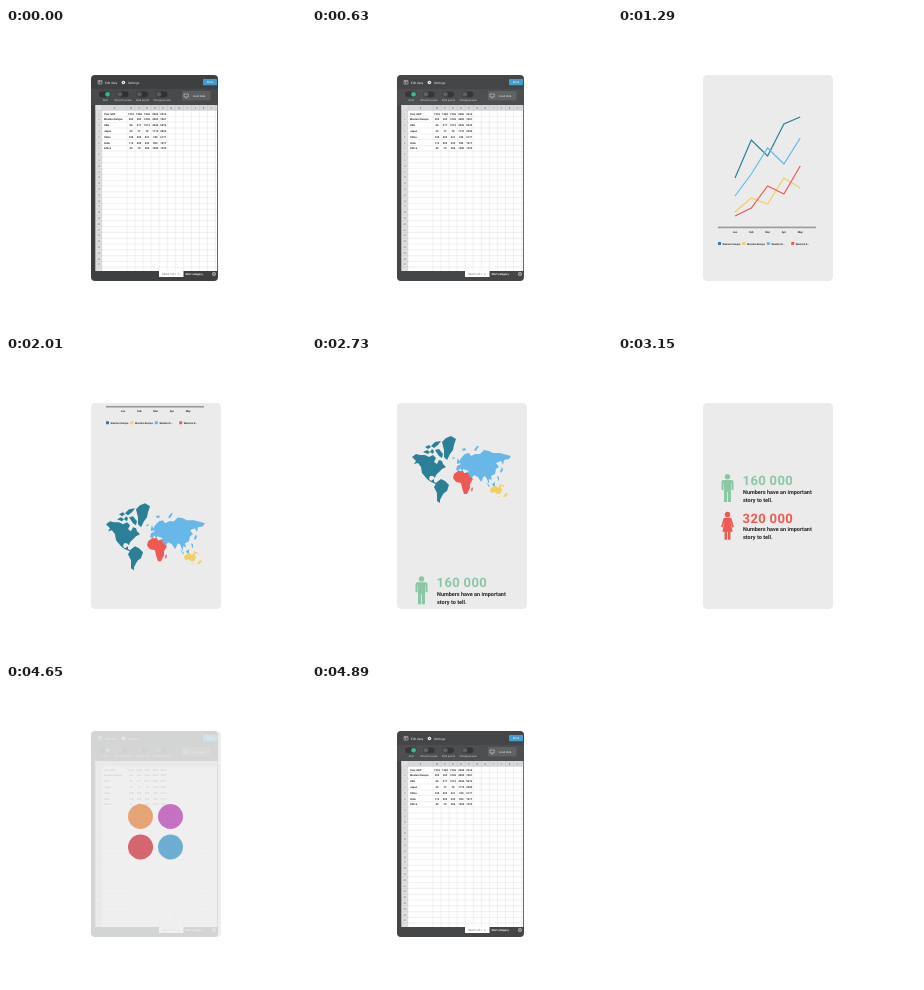
An HTML page for the animation above (4.92 s loop, 300x300 px).

```html
<!DOCTYPE html>
<html lang="en">
<head>
<meta charset="utf-8">
<style>
html, body { margin: 0; width: 100%; height: 100%; overflow: hidden; background: #fff; }
svg { display: block; width: 100vw; height: 100vh; font-family: Roboto, sans-serif; text-rendering: geometricPrecision; }
</style>
</head>
<body>
<svg id="stage" viewBox="0 0 300 300"></svg>
<script>
const LOOP = 4920, STEP = 30;
const TEAL = '#2b7f96', YELLOW = '#f2cf5e', BLUE = '#67b8e8', RED = '#ee5a52', GREEN = '#8bc6a5';

const rect = (x, y, w, h, fill, r = 0) =>
  `<rect x="${x}" y="${y}" width="${w}" height="${h}" rx="${r}" fill="${fill}"/>`;
const circle = (x, y, r, fill) => `<circle cx="${x}" cy="${y}" r="${r}" fill="${fill}"/>`;
const text = (x, y, size, fill, str, extra = '') =>
  `<text x="${x}" y="${y}" font-size="${size}" fill="${fill}" ${extra}>${str}</text>`;
const path = (d, fill, extra = '') => `<path d="${d}" fill="${fill}" ${extra}/>`;
const group = (id, body, extra = '') => `<g id="${id}" ${extra}>${body}</g>`;
const MID = 'text-anchor="middle"', BOLD = 'font-weight="700"';

function sheet() {
  const top = 82.6, rowH = 5.8, colX = i => i ? 121 + (i - 1) * 8.05 : 96;
  let s = rect(85, 47, 127, 206, '#3e3f41', 4) + rect(85, 61, 127, 16, '#48494b');

  // Header
  s += path('M92 52.5h4v3.6h-4zM92 53.7h4M93.4 52.5v3.6', 'none', 'stroke="#ccc" stroke-width=".5"');
  s += text(99, 55.5, 3.1, '#eee', 'Edit data') + circle(117.4, 54.5, 1.8, '#eee') + circle(117.4, 54.5, .6, '#3e3f41');
  s += text(122, 55.5, 3.1, '#eee', 'Settings');
  s += rect(197, 51, 14, 6.2, '#3d9bd0', .7) + text(204, 55.2, 2.9, '#fff', 'Done', MID);

  // Toolbar
  ['Grid', 'Smooth curves', 'Data points', 'Transpose axis'].forEach((label, i) => {
    const x = [93, 111, 130.5, 150][i];
    s += rect(x, 63.4, 11.5, 5.8, '#303133', 2.9);
    s += circle(x + (i ? 2.9 : 8.6), 66.3, 2.4, i ? '#5a5b5d' : '#35b48a');
    s += text(x + 6, 72.8, 2.6, '#ddd', label, MID);
  });
  s += rect(176, 63, 28.5, 9.6, '#5c5d60', .8);
  s += path('M178 66h4.4v3h-4.4zM179.3 70h1.8', 'none', 'stroke="#ddd" stroke-width=".5"');
  s += text(193, 69, 2.8, '#eee', 'Load data', MID);

  // Grid
  s += rect(89.6, 77, 121.6, 166, '#fff') + rect(89.6, 77, 121.6, 5.6, '#d6d7d8') + rect(89.6, 77, 6.4, 166, '#dedfe0');
  let lines = '';
  for (let i = 0; i < 28; i++) {
    const y = top + i * rowH;
    lines += `M89.6 ${y}H211.2`;
    if (i < 27) s += text(92.8, y + 4, 2.4, '#666', i + 1, MID);
  }
  for (let i = 0; i < 13; i++) {
    lines += `M${colX(i)} 77V243`;
    if (i < 12) s += text((colX(i) + colX(i + 1)) / 2, 81, 2.5, '#444', 'ABCDEFGHIJKL'[i], MID);
  }
  s += path(lines, 'none', 'stroke="#999" stroke-width=".25" opacity=".55"');
  [
    'Year, GDP|1976|1986|1996|2006|2016',
    'Western Europe|302|362|1006|4000|7067',
    'USA|86|217|1013|4246|5674',
    'Japan|30|77|78|1710|2096',
    'China|100|200|221|740|6171',
    'India|113|209|222|500|1377',
    'Africa|43|70|306|1300|1372'
  ].forEach((row, r) => row.split('|').forEach((cell, c) => {
    s += text(c ? colX(c) + 4 : 98, top + r * rowH + 4, 2.6, '#222', cell, BOLD + (c ? ' ' + MID : ''));
  }));

  // Tabs
  s += rect(153, 242.8, 24.5, 6.2, '#fff') + text(156, 247, 2.7, '#444', 'Chart 1 of 1') + text(172, 247, 3, '#444', '×');
  s += text(179.5, 247, 2.7, '#fff', 'Start category', BOLD);
  s += circle(208, 246, 2, '#aaa') + path('M207 246h2M208 245v2', 'none', 'stroke="#3e3f41" stroke-width=".5"');
  return s;
}

function chart() {
  const months = ['Jan', 'Feb', 'Mar', 'Apr', 'May'], x = i => 117 + i * 16.3;
  const series = [[TEAL, 150, 112, 128, 96, 89], [YELLOW, 184, 170, 176, 150, 160],
                  [BLUE, 168, 146, 120, 136, 110], [RED, 188, 180, 158, 166, 138]];
  let s = rect(100, 198.6, 98, 1.6, '#999');
  months.forEach((m, i) => s += text(x(i), 204.6, 2.6, '#222', m, MID + BOLD.padStart(20)));
  series.forEach(([color, ...ys], i) => {
    s += path('M' + ys.map((y, j) => x(j) + ' ' + y).join('L'), 'none', `stroke="${color}" stroke-width="1.2"`);
    s += rect(100 + i * 24.4, 214, 3, 3, color, .6);
    s += text(104.6 + i * 24.4, 216.6, 2.5, '#222', i < 2 ? 'Western Europe' : 'Western E...', BOLD);
  });
  return s;
}

function map() {
  const americas = 'M100 101L104 98 108 99 113 99 117 101 121 99 124 102 122 106 125 108 127 104 130 105 131 108 134 111 130 113 127 116 124 119 123 122 121 120 118 120 117 123 119 125 122 123 122 126 125 127 124 128 119 126 115 123 110 117 109 111 106 107 102 108 104 105z'
    + 'M111 96l4-2 3 2-2 2zM113 91l4-2 2 2-3 2zM118 96l2-3 2 2-1 3zM119 90l4-4 6-1-3 4-4 3zM123 94l4-1 4 5-1 4-3-2z'
    + 'M130 86L134 82 139 80 144 83 142 89 141 94 138 98 135 104 132 101 132 94z'
    + 'M125 126L129 123 133 125 137 129 135 135 132 137 130 140 128 144 128 147 125 145 125 137 122 131z';
  const eurasia = 'M144 114L145 110 149 108 147 106 149 102 153 98 157 97 159 100 163 98 168 98 172 94 177 95 181 97 188 97 199 100 197 103 192 104 191 109 189 105 184 107 187 111 184 113 183 118 179 120 180 124 177 123 177 128 174 121 172 120 169 126 166 121 162 119 160 122 156 124 153 117 157 115 151 113 151 116 148 112 147 115z'
    + 'M145 105l1-3 2 5-3 1zM140 102l2-1 1 1-2 1zM150 93l3-1 1 2-3 1zM162 94l3-4 2 0-3 5z'
    + 'M188 115l2-4 1 3-2 3zM174 126l4 4-1 1zM180 128l3-2 0 4-2 0zM185 120l1 4 1 1 0-4z';
  const africa = 'M142 118L146 115 151 115 152 117 156 117 158 121 161 123 158 128 158 132 155 138 152 138 150 132 149 127 144 126 141 122zM159 134l1-3 1 1-1 4z';
  const oceania = 'M178 133L182 130 184 130 186 132 188 129 190 134 188 138 185 138 183 136 179 137zM186 140h2l-1 1zM191 141l3-4 2 1-3 3zM187 128l4 1 2 2-4-1z';
  return path(americas, TEAL) + path(eurasia, BLUE) + path(africa, RED) + path(oceania, YELLOW);
}

function fact(y, color, figure, body) {
  return circle(109.5, y + 2.6, 2.7, color) + `<g transform="translate(109.5 ${y})">${path(body, color)}</g>`
    + text(124.6, y + 10.8, 13, color, figure, BOLD + ' letter-spacing=".35"')
    + text(125, y + 19.5, 5.5, '#222', 'Numbers have an important', BOLD)
    + text(125, y + 27.5, 5.5, '#222', 'story to tell.', BOLD);
}

function numbers() {
  const man = 'M-4 6H4Q6 6 6 8V16H4V9.5H3.5V28H.4V18H-.4V28H-3.5V9.5H-4V16H-6V8Q-6 6-4 6z';
  const woman = 'M-2.6 6H2.6Q3.8 6 4.2 7.4L6.4 15 4.8 15.6 2.6 9 5.2 20H3V28H.5V20H-.5V28H-3V20H-5.2L-2.6 9-4.8 15.6-6.4 15-4.2 7.4Q-3.8 6-2.6 6z';
  return fact(118, GREEN, '160 000', man) + fact(155.7, RED, '320 000', woman);
}

const dots = () => ['#de8544', '#b23fae', '#c62f3c', '#3b92c4']
  .map((c, i) => circle(134.5 + i % 2 * 30, i < 2 ? 132.5 : 163, 12.5, c)).join('');

const pages = [chart(), `<g transform="translate(0 36.8)">${map()}</g>`, numbers(), dots()];
const scrolls = [[1830, 179], [2730, 139], [3630, 168]];

const stage = document.getElementById('stage');
stage.innerHTML = `<clipPath id="cardClip">${rect(85, 47, 130, 206, '#000', 4)}</clipPath>`
  + group('card', rect(85, 47, 130, 206, '#ebebeb', 4) + pages.map((p, i) => group('page' + i, p)).join(''), 'clip-path="url(#cardClip)"')
  + group('sheet', sheet());

const el = id => document.getElementById(id);
const clamp = v => Math.min(1, Math.max(0, v));
const place = (id, x, y, opacity = 1) => {
  el(id).setAttribute('transform', `translate(${x} ${y})`);
  el(id).setAttribute('opacity', opacity);
};

// Each scroll starts with a small jump, then eases out.
const scrollEase = (t, start) => t < start ? 0 : 1 - (1 - clamp((t - start + 50) / 515)) ** 3;

function draw(now) {
  const t = Math.floor(now % LOOP / STEP) * STEP;
  const out = clamp((t - 600) / 300), enter = clamp((t - 900) / 400);
  const back = t < 4650 ? 0 : 1 - (1 - clamp((t - 4620) / 300)) ** 1.5;

  if (t < 4650) place('sheet', -42 * out ** 3.5, 0, 1 - out ** 1.5);
  else place('sheet', 0, 0, back);
  place('card', 30 * (1 - enter) ** 3, 0, clamp(enter / .65) * (1 - back));

  let y = -scrolls.reduce((sum, [start, dist]) => sum + dist * scrollEase(t, start), 0);
  pages.forEach((_, i) => {
    place('page' + i, 0, y);
    if (i < scrolls.length) y += scrolls[i][1];
  });
}

const begin = performance.now();
(function tick() {
  draw(performance.now() - begin);
  requestAnimationFrame(tick);
})();
</script>
</body>
</html>
```
